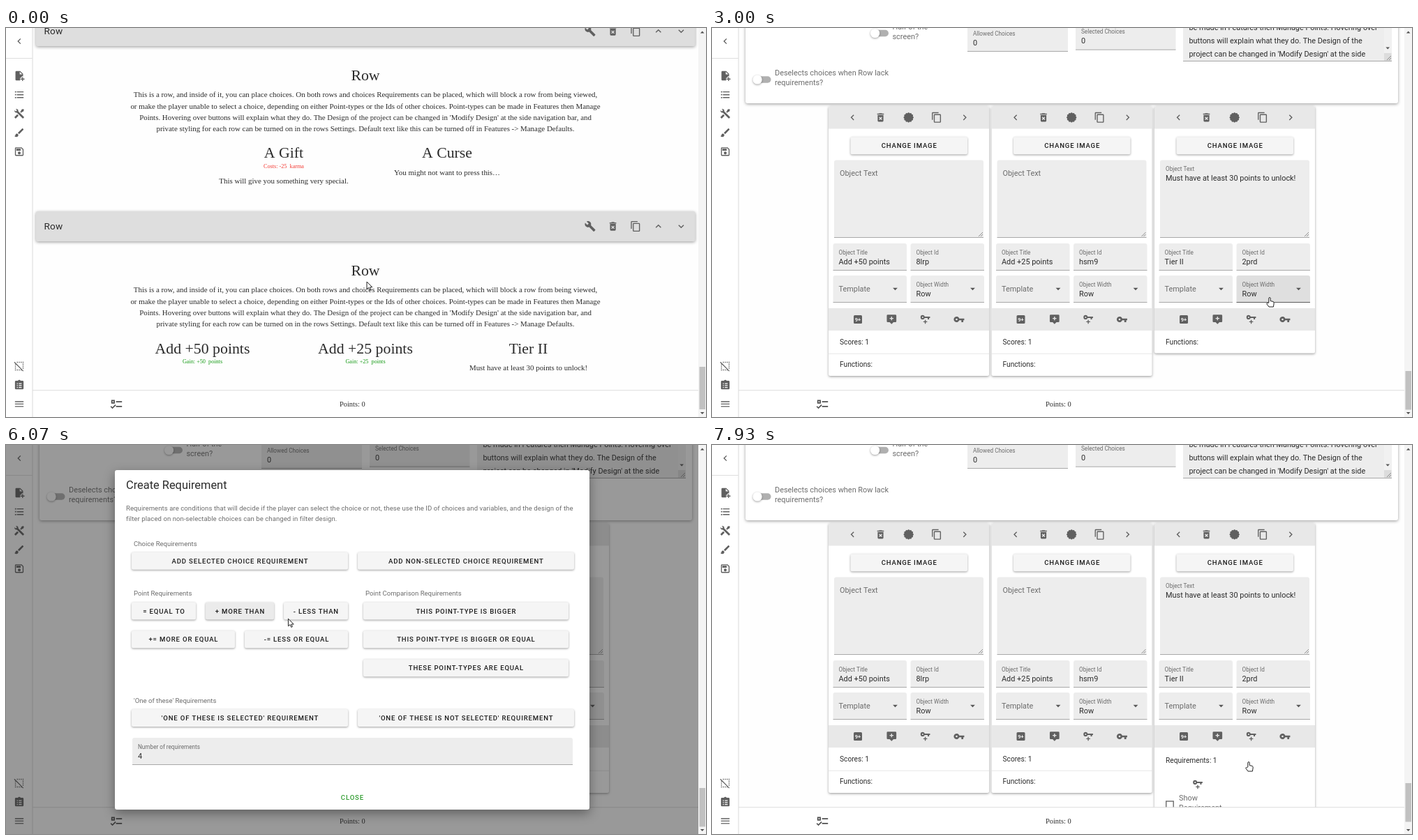
Write an HTML page with a canvas that moves like this. It is 1003x558 px and loops after 8 s.

```html
<!DOCTYPE html>
<html>
<head>
<meta charset="utf-8">
<style>
html, body { margin: 0; width: 100%; height: 100%; overflow: hidden; background: #fff }
canvas { display: block }
</style>
</head>
<body>
<canvas id="stage" width="1003" height="558"></canvas>
<script>
const c = document.getElementById('stage').getContext('2d');
const LOOP = 8000;
const SANS = 'Roboto, sans-serif', SERIF = '"Liberation Serif", serif';
const INK = '#2b2b2b', SOFT = '#6c6c6c', ICON = '#606060', FIELD = '#ededed';

// 24-unit icon outlines
const icons = {
  wrench: 'M22.7,19L13.6,9.9C14.5,7.6 14,4.9 12.1,3C10.1,1 7.1,.6 4.7,1.7L9,6L6,9L1.6,4.7C.4,7.1 .9,10.1 2.9,12.1C4.8,14 7.5,14.5 9.8,13.6L18.9,22.7C19.3,23.1 19.9,23.1 20.3,22.7L22.6,20.4C23.1,20 23.1,19.3 22.7,19Z',
  trash: 'M6,19A2,2 0 0,0 8,21H16A2,2 0 0,0 18,19V7H6ZM8.46,11.88L9.87,10.47L12,12.59L14.12,10.47L15.53,11.88L13.41,14L15.53,16.12L14.12,17.53L12,15.41L9.88,17.53L8.47,16.12L10.59,14ZM15.5,4L14.5,3H9.5L8.5,4H5V6H19V4Z',
  copy: 'M19,21H8V7H19M19,5H8A2,2 0 0,0 6,7V21A2,2 0 0,0 8,23H19A2,2 0 0,0 21,21V7A2,2 0 0,0 19,5M16,1H4A2,2 0 0,0 2,3V17H4V3H16Z',
  up: 'M7.41,15.41L12,10.83L16.59,15.41L18,14L12,8L6,14Z',
  down: 'M7.41,8.59L12,13.17L16.59,8.59L18,10L12,16L6,10Z',
  left: 'M15.41,16.59L10.83,12L15.41,7.41L14,6L8,12L14,18Z',
  right: 'M8.59,16.59L13.17,12L8.59,7.41L10,6L16,12L10,18Z',
  back: 'M20,11V13H8L13.5,18.5L12.08,19.92L4.16,12L12.08,4.08L13.5,5.5L8,11Z',
  addFile: 'M13,9H18.5L13,3.5ZM6,2H14L20,8V13H17V16H14V22H6A2,2 0 0,1 4,20V4A2,2 0 0,1 6,2M18,15H20V18H23V20H20V23H18V20H15V18H18Z',
  list: 'M7,5H21V7H7ZM7,11H21V13H7ZM7,17H21V19H7ZM3,4.7H5.5V7.3H3ZM3,10.7H5.5V13.3H3ZM3,16.7H5.5V19.3H3Z',
  tools: 'M21.71,20.29L20.29,21.71A1,1 0 0,1 18.88,21.71L7,9.85A3.8,3.8 0 0,1 6,10A4,4 0 0,1 2.22,4.7L4.76,7.24L7.24,4.76L4.7,2.22A4,4 0 0,1 10,6A3.8,3.8 0 0,1 9.85,7L21.71,18.88A1,1 0 0,1 21.71,20.29M2.29,18.88A1,1 0 0,0 2.29,20.29L3.71,21.71A1,1 0 0,0 5.12,21.71L10.59,16.25L7.76,13.42ZM20,2L16,4V6L13.83,8.17L15.83,10.17L18,8H20L22,4Z',
  brush: 'M20.71,4.63L19.37,3.29C19,2.9 18.35,2.9 17.96,3.29L9,12.25L11.75,15L20.71,6.04C21.1,5.65 21.1,5 20.71,4.63M7,14A3,3 0 0,0 4,17C4,18.31 2.84,19 2,19C2.92,20.22 4.5,21 6,21A4,4 0 0,0 10,17A3,3 0 0,0 7,14Z',
  save: 'M17,3H5A2,2 0 0,0 3,5V19A2,2 0 0,0 5,21H19A2,2 0 0,0 21,19V7ZM19,19H5V5H16.17L19,7.83ZM12,12A3,3 0 0,0 12,18A3,3 0 0,0 12,12M6,6H15V10H6Z',
  clipboard: 'M19,3H14.8A3,3 0 0,0 9.2,3H5A2,2 0 0,0 3,5V19A2,2 0 0,0 5,21H19A2,2 0 0,0 21,19V5A2,2 0 0,0 19,3M7,8H9V10H7ZM11,8H17V10H11ZM7,12H9V14H7ZM11,12H17V14H11ZM7,16H9V18H7ZM11,16H17V18H11Z',
  menu: 'M3,6H21V8H3ZM3,11H21V13H3ZM3,16H21V18H3Z',
  checks: 'M3,5H9V11H3ZM5,7V9H7V7ZM11,7H21V9H11ZM11,15H21V17H11ZM5,20L1.5,16.5L2.91,15.09L5,17.17L9.59,12.59L11,14Z',
  addKey: 'M6.5,3C8.46,3 10.13,4.25 10.74,6H22V9H20V12H17V9H10.74C10.13,10.75 8.46,12 6.5,12A4.5,4.5 0 0,1 6.5,3M6.5,6A1.5,1.5 0 0,0 6.5,9A1.5,1.5 0 0,0 6.5,6M11,13H13V16H16V18H13V21H11V18H8V16H11Z',
  key: 'M7,14A2,2 0 0,1 7,10A2,2 0 0,1 7,14M12.65,10A6,6 0 1,0 12.65,14H17V18H21V14H23V10Z',
  tip: 'M4,2H20A2,2 0 0,1 22,4V16A2,2 0 0,1 20,18H16L12,22L8,18H4A2,2 0 0,1 2,16V4A2,2 0 0,1 4,2M11,6V9H8V11H11V14H13V11H16V9H13V6Z',
  dashed: 'M1,4.27L2.28,3L21,21.72L19.73,23Z' +
    [7, 11, 15, 19].map(n => `M3,${n}h2v2h-2ZM${n},3h2v2h-2Z`).join('') +
    [7, 11, 15].map(n => `M19,${n}h2v2h-2ZM${n},19h2v2h-2Z`).join(''),
  seal: 'M' + Array.from({ length: 24 }, (_, i) => {
    const r = i % 2 ? 9.3 : 10.8, a = i * Math.PI / 12;
    return [12 + r * Math.cos(a), 12 + r * Math.sin(a)];
  }).join('L') + 'Z'
};
for (const name in icons) icons[name] = new Path2D(icons[name]);
const arrow = new Path2D('M0,0V10.6L2.6,8.4L4.3,12.2L6,11.4L4.4,7.8H7.8Z');
const hand = new Path2D('M-1.2,7V.8A1.2,1.2 0 0,1 1.2,.8V4.6L5,5.4Q6.4,6 6.2,8L5.4,13H-1L-4.3,8.6Q-4,6.8 -2.6,7.8Z');

const clamp = v => Math.max(0, Math.min(1, v));
const ramp = (t, from, to) => clamp((t - from) / (to - from));

function text(str, x, y, size = 10.9, color = INK, { font = SANS, align = 'left', weight = 400, gap = 0 } = {}) {
  c.font = `${weight} ${size}px ${font}`;
  c.textAlign = align;
  c.letterSpacing = gap + 'px';
  c.fillStyle = color;
  c.fillText(str, x, y + size * .35);
}
const serif = (str, x, y, size, color) => text(str, x, y, size, color, { font: SERIF, align: 'center' });

function box(x1, y1, x2, y2, fill, radius = 0, shadow = 0) {
  c.save();
  if (shadow) { c.shadowColor = 'rgba(0,0,0,.38)'; c.shadowBlur = shadow; c.shadowOffsetY = shadow / 3; }
  c.fillStyle = fill;
  c.beginPath();
  c.roundRect(x1, y1, x2 - x1, y2 - y1, radius);
  c.fill();
  c.restore();
}
function disc(x, y, r, fill) {
  c.fillStyle = fill;
  c.beginPath();
  c.arc(x, y, r, 0, 7);
  c.fill();
}
function icon(name, x, y, size = 16.4, color = ICON) {
  c.save();
  c.translate(x - size / 2, y - size / 2);
  c.scale(size / 24, size / 24);
  c.fillStyle = color;
  c.fill(icons[name], 'evenodd');
  c.restore();
}
function shifted(dy, draw) {
  c.save();
  c.translate(0, dy);
  draw();
  c.restore();
}
function triangle(x, y, w, h, color = '#555') {
  c.fillStyle = color;
  c.beginPath();
  c.moveTo(x - w, y - h / 2); c.lineTo(x + w, y - h / 2); c.lineTo(x, y + h / 2);
  c.fill();
}
function button(label, x1, x2, y) {
  box(x1, y - 12.7, x2, y + 12.3, '#f5f5f5', 2.5, 3);
  text(label, (x1 + x2) / 2 + .4, y, 9.55, '#1c1c1c', { align: 'center', weight: 500, gap: .85 });
}
function field(label, value, x1, x2, y, { select, hover } = {}) {
  box(x1, y, x2, y + 39, hover ? '#dfdfdf' : FIELD, [3, 3, 0, 0]);
  box(x1, y + 38.3, x2, y + 39, hover ? '#333' : '#929292');
  if (value) {
    text(label, x1 + 8, y + 13, 8.2, SOFT);
    text(value, x1 + 8, y + 26);
  } else text(label, x1 + 8, y + 19, 10.9, SOFT);
  if (select) triangle(x2 - 16.5, y + 19.5, 3.4, 3.4);
}
function grip(x, y) {
  c.strokeStyle = '#777';
  c.lineWidth = .8;
  c.beginPath();
  for (const d of [3, 6]) { c.moveTo(x - d - 1, y - 1); c.lineTo(x - 1, y - d - 1); }
  c.stroke();
}
function toggle(x, y, ...lines) {
  box(x - 1, y - 4.7, x + 20, y + 4.7, '#b0b0b0', 5);
  box(x - 6, y - 6.6, x + 7.2, y + 6.6, '#fff', 7, 3);
  lines.forEach((line, i) => text(line, x + 25.5, y - 2.5 + (i - (lines.length - 1) / 2) * 13.8 - (lines.length > 1 ? 0 : .3), 10.9, SOFT));
}

const intro = [
  'This is a row, and inside of it, you can place choices. On both rows and choices Requirements can be placed, which will block a row from being viewed,',
  'or make the player unable to select a choice, depending on either Point-types or the Ids of other choices. Point-types can be made in Features then Manage',
  "Points. Hovering over buttons will explain what they do. The Design of the project can be changed in 'Modify Design' at the side navigation bar, and",
  'private styling for each row can be turned on in the rows Settings. Default text like this can be turned off in Features -> Manage Defaults.'
];
const rowText = [
  'This is a row, and inside of it, you can place choices. On',
  'both rows and choices Requirements can be placed,',
  'which will block a row from being viewed, or make the',
  'player unable to select a choice, depending on either',
  'Point-types or the Ids of other choices. Point-types can',
  'be made in Features then Manage Points. Hovering over',
  'buttons will explain what they do. The Design of the',
  "project can be changed in 'Modify Design' at the side"
];

function rowBar(y, editing) {
  box(43, y - 21.5, 987.5, y + 21.5, '#dedede', 2.5, 4);
  text('Row', 54.5, y, 13.6, INK, { gap: .17 });
  if (editing) disc(837, y, 10.5, 'rgba(0,0,0,.1)');
  [editing ? 'back' : 'wrench', 'trash', 'copy', 'up', 'down']
    .forEach((name, i) => icon(name, 837 + i * 32.6, y));
}
function rowIntro(y) {
  serif('Row', 515, y, 21.8);
  intro.forEach((line, i) => serif(line, 515, y + 28.5 + i * 16.3, 10.9));
}
function choice(title, x, y, note, color, body, bodyY) {
  serif(title, x, y, 21.8);
  if (note) serif(note, x, y + 19.3, 8.2, color);
  if (body) serif(body, x, bodyY, 10.9);
}

function rowEditor(t) {
  box(48, 100, 983, 379, '#fff', 3, 4);
  box(48, 100, 983, 132, FIELD, [3, 3, 0, 0]);
  ['addFile', 'list', 'addKey', 'seal'].forEach((name, i) => icon(name, 866 + i * 32.5, 116.5));
  button('CHANGE IMAGE', 55, 202, 161.5);
  toggle(233, 164, 'Button?');
  toggle(233, 195.5, 'Non-activatable?');
  toggle(233, 233.5, 'Selected', 'Choices?');
  toggle(233, 278.5, 'Half of the', 'screen?');
  toggle(64.5, 345, 'Deselects choices when Row lack', 'requirements?');
  field('Template', 'Image Top', 366, 510, 149, { select: true });
  field('Row Title', 'Row', 366, 510, 207.5);
  field('Allowed Choices', '0', 366, 510, 266);
  field('Objects Per Row', '4 per Row', 521, 664.5, 149, { select: true });
  field('Choices Justify', 'center', 521, 664.5, 187.3, { select: true });
  field('Row Id', '52mk', 521, 664.5, 225.5);
  field('Selected Choices', '0', 521, 664.5, 263.5);

  const hover = t > 2120 && t < 2540;
  box(675, 149, 974, 319, hover ? '#d9d9d9' : FIELD, [3, 3, 0, 0]);
  text('Row Text', 683.5, 162, 8.2, SOFT);
  rowText.forEach((line, i) => text(line, 683.5, 175 + i * 19.05));
  box(963, 165, 973.5, 307, '#f1f1f1');
  box(964, 178, 972.5, 262, '#c1c1c1');
  triangle(968.2, 171.5, 2.8, -3, '#999');
  triangle(968.2, 300, 2.8, 3);
  box(963, 307, 973.5, 318, '#dcdcdc');
  grip(974, 318);
  box(675, 318.3, 974, 319, hover ? '#333' : '#929292');
}

function card(x, t, title, id, body) {
  const third = !!body;
  const added = third && t >= 5800;
  const open = third ? ramp(t, 7830, 8130) : 0;
  const bottom = third && !added ? 466.5 : 499 + open * 210;
  box(x, 112, x + 230, bottom, '#fff', 2.5, 3.5);
  box(x, 112, x + 230, 144.5, '#e8e8e8', [2.5, 2.5, 0, 0]);
  ['left', 'trash', 'seal', 'copy', 'right'].forEach((name, i) => icon(name, x + 34.3 + i * 40.2, 128.3));
  button('CHANGE IMAGE', x + 31.5, x + 199, 169);

  box(x + 8, 189.5, x + 222, 301, FIELD, [3, 3, 0, 0]);
  box(x + 8, 300.3, x + 222, 301, '#929292');
  text('Object Text', x + 16, third ? 202.5 : 208, third ? 8.2 : 10.9, SOFT);
  if (third) text(body, x + 16, 215);
  grip(x + 222, 300);

  const hover = third && (t > 2940 && t < 3180 || t > 7300 && t < 7560);
  field('Object Title', title, x + 6.5, x + 112, 309);
  field('Object Id', id, x + 117.5, x + 223, 309);
  field('Template', '', x + 6.5, x + 112, 355, { select: true });
  field('Object Width', 'Row', x + 117.5, x + 223, 355, { select: true, hover });

  box(x, 402, x + 230, 434, '#e8e8e8');
  if (third && t > 4330 && t < 6640) disc(x + 139, 418, 16 * ramp(t, 4310, 4440), 'rgba(0,0,0,.22)');
  box(x + 36, 412, x + 48, 424, ICON, 1.5);
  text('9+', x + 42, 418, 7.5, '#f0f0f0', { align: 'center', weight: 700 });
  ['tip', 'addKey', 'key'].forEach((name, i) => icon(name, x + 90.3 + i * 48.3, 418));

  const panel = (label, y) => text(label, x + 16, y, 10.2);
  if (third && !added) return panel('Functions:', 450.5);
  panel(third ? 'Requirements: 1' : 'Scores: 1', 450.3 + open * 5);
  if (open) {
    c.save();
    c.beginPath();
    c.rect(x, 467, 230, open * 210);
    c.clip();
    icon('addKey', x + 62, 487);
    c.strokeStyle = SOFT;
    c.lineWidth = 1.4;
    c.strokeRect(x + 16.7, 511, 10.5, 10.5);
    text('Show', x + 35, 506.5, 10.9, SOFT);
    text('Requirement', x + 35, 520, 10.9, SOFT);
    c.restore();
  }
  box(x, 466.7 + open * 210, x + 230, 467.5 + open * 210, '#dedede');
  panel('Functions:', 482.8 + open * 210);
}

function page(t, scroll, editing) {
  shifted(-scroll, () => {
    rowBar(4.5);
    rowIntro(67);
    choice('A Gift', 398, 178.5, 'Costs: -25  karma', '#f33a33', 'This will give you something very special.', 219);
    choice('A Curse', 632, 178.5, '', '', 'You might not want to press this…', 207);
    rowBar(284.5, editing);
    if (editing) return;
    rowIntro(347);
    choice('Add +50 points', 281.5, 459, 'Gain: +50  points', '#159a15');
    choice('Add +25 points', 515, 459, 'Gain: +25  points', '#159a15');
    choice('Tier II', 748.5, 459, '', '', 'Must have at least 30 points to unlock!', 487);
    if (t > 1800) disc(837, 284.5, 10.5 * ramp(t, 1740, 1860), 'rgba(0,0,0,.14)');
  });
  if (!editing) return;
  shifted(218 - scroll, () => rowEditor(t));
  shifted(489 - scroll, () => {
    card(167, t, 'Add +50 points', '8lrp');
    card(400.5, t, 'Add +25 points', 'hsm9');
    card(634, t, 'Tier II', '2prd', 'Must have at least 30 points to unlock!');
  });
}

function chrome() {
  box(38, 520, 992, 558, '#fff');
  box(38, 519.3, 992, 520.3, '#dcdcdc');
  icon('checks', 158.5, 539.5, 20.5, '#505050');
  text('Points: 0', 478, 539.5, 10.4, INK, { font: SERIF });
  box(0, 0, 38, 558, '#fff');
  box(37.5, 0, 38.5, 558, '#d9d9d9');
  box(0, 43, 38, 44, '#dedede');
  icon('left', 19, 19);
  ['addFile', 'list', 'tools', 'brush', 'save'].forEach((name, i) => icon(name, 19, 68.5 + i * 27.2));
  ['dashed', 'clipboard', 'menu'].forEach((name, i) => icon(name, 19, 485 + i * 27.2));
}

function dialog(t, p) {
  c.save();
  c.globalAlpha = p;
  c.translate(496, 279.5);
  c.scale(.5 + p / 2, .5 + p / 2);
  c.translate(-496, -279.5);
  box(156, 36, 836, 523, '#fff', 3, 16);
  text('Create Requirement', 172, 57, 16.4);
  text('Requirements are conditions that will decide if the player can select the choice or not, these use the ID of choices and variables, and the design of the', 172, 90.5, 9.55, SOFT, { gap: .07 });
  text('filter placed on non-selectable choices can be changed in filter design.', 172, 105.3, 9.55, SOFT, { gap: .07 });
  text('Choice Requirements', 183, 141.5, 9.55, SOFT);
  text('Point Requirements', 183, 213, 9.55, SOFT);
  text('Point Comparison Requirements', 515, 213, 9.55, SOFT);
  text("'One of these' Requirements", 183, 366.5, 9.55, SOFT);
  button('ADD SELECTED CHOICE REQUIREMENT', 180, 490, 166.5);
  button('ADD NON-SELECTED CHOICE REQUIREMENT', 504, 814, 166.5);
  button('= EQUAL TO', 180, 272, 238.3);
  button('+ MORE THAN', 286, 384, 238.3);
  button('- LESS THAN', 398, 490, 238.3);
  button('+= MORE OR EQUAL', 180, 328, 279);
  button('-= LESS OR EQUAL', 342, 490, 279);
  button('THIS POINT-TYPE IS BIGGER', 512, 806, 238.3);
  button('THIS POINT-TYPE IS BIGGER OR EQUAL', 512, 806, 279);
  button('THESE POINT-TYPES ARE EQUAL', 512, 806, 320);
  button("'ONE OF THESE IS SELECTED' REQUIREMENT", 180, 490, 391.7);
  button("'ONE OF THESE IS NOT SELECTED' REQUIREMENT", 504, 814, 391.7);
  field('Number of requirements', '4', 181, 812, 420);
  text('CLOSE', 496.4, 505.7, 9.55, '#2e9b2e', { align: 'center', weight: 500, gap: .85 });
  if (t > 5730 && t < 6130) {
    c.save();
    c.beginPath();
    c.rect(286, 226, 98, 25);
    c.clip();
    disc(300, 238, 90 * ramp(t, 5700, 5950), `rgba(0,0,0,${.16 * (1 - ramp(t, 5900, 6130))})`);
    c.restore();
  }
  c.restore();
}

function scrollbar(t, scroll, editing) {
  box(992, 0, 1003, 558, '#f4f4f4');
  const grown = ramp(t, 7830, 7930) * 7;
  const top = editing ? 441.5 + scroll * .1033 - grown : 486;
  box(993.5, top, 1002, editing ? top + 55.5 : 547, '#c1c1c1');
  triangle(997.7, 6, 2.8, -3, '#505050');
  triangle(997.7, 552.5, 2.8, 3, '#505050');
}

// time, x, y of the pointer tip
const route = [
  [530, 517, 364], [1330, 839, 280], [1400, 838, 281], [1900, 838, 281], [2420, 829, 334], [2560, 829, 334],
  [2990, 799, 387], [3100, 799, 387], [3470, 728, 414], [3870, 776, 417], [4800, 775, 417], [5150, 518, 327],
  [5530, 300, 238], [5900, 300, 238], [6530, 877, 300], [6670, 877, 300], [7470, 800, 381], [7680, 769, 455]
];
const handTimes = [[1270, 1950], [2950, 4400], [5430, 5950], [7300, 8000]];

function pointer(t) {
  const next = route.findIndex(k => k[0] > t);
  let [, x, y] = route[next < 0 ? route.length - 1 : Math.max(0, next - 1)];
  if (next > 0) {
    const [a, b] = [route[next - 1], route[next]];
    const p = ramp(t, a[0], b[0]), e = p * p * (3 - 2 * p);
    x += (b[1] - x) * e;
    y += (b[2] - y) * e;
  }
  const shape = handTimes.some(([from, to]) => t >= from && t < to) ? hand : arrow;
  c.save();
  c.translate(x, y);
  c.fillStyle = '#fff';
  c.strokeStyle = '#222';
  c.lineWidth = 1;
  c.fill(shape);
  c.stroke(shape);
  c.restore();
}

function draw(now) {
  const t = now % LOOP;
  const editing = t >= 1930;
  const scroll = 489 * ramp(t, 2050, 2992);
  c.fillStyle = '#fefefe';
  c.fillRect(0, 0, 1003, 558);
  page(t, scroll, editing);
  chrome();

  const opened = 1 - (1 - ramp(t, 4365, 4665)) ** 2;
  const shade = .46 * opened * (1 - ramp(t, 6600, 6810));
  if (shade) box(0, 0, 992, 558, `rgba(33,33,33,${shade})`);
  if (opened && t < 6640) dialog(t, opened);
  scrollbar(t, scroll, editing);
  pointer(t);
  requestAnimationFrame(draw);
}
requestAnimationFrame(draw);
</script>
</body>
</html>
```
